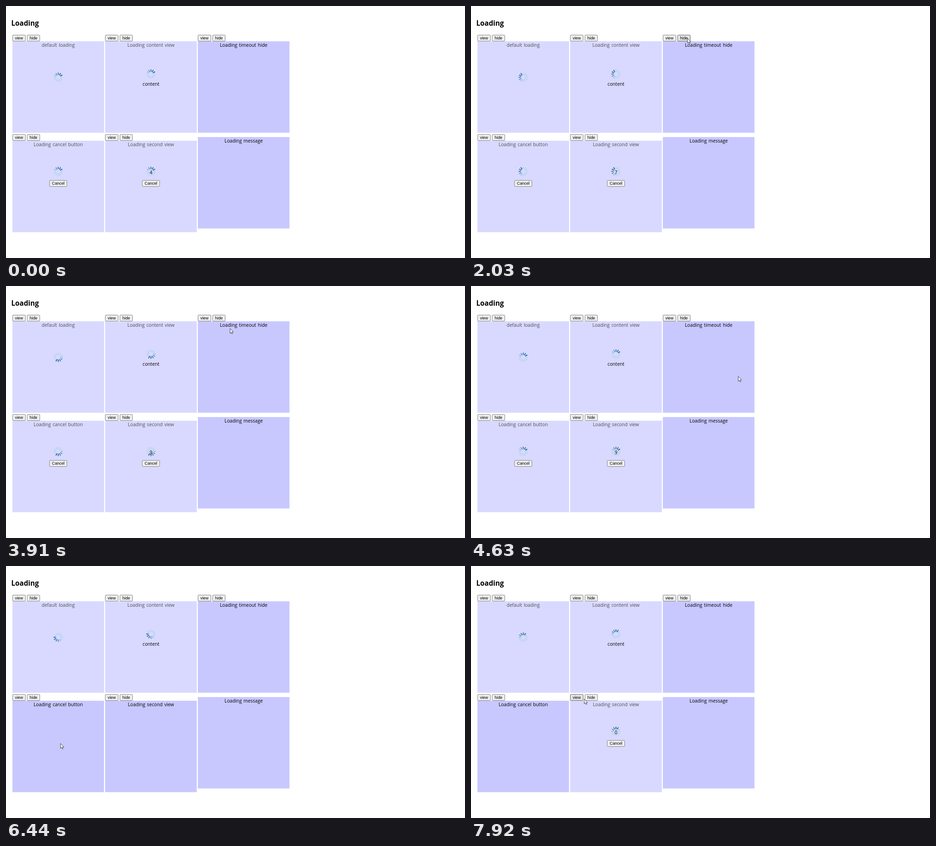
These frames come from a looping animation (1000 by 550 pixels, 8 s). An HTML page:

```html
<!DOCTYPE html>
<html lang="en">
<head>
<meta charset="utf-8">
<title>Loading</title>
<style>
  html, body { margin: 0; width: 100%; height: 100%; overflow: hidden; background: #fff; }
  svg { display: block; width: 1000px; height: 550px; }
  text { font: 10.2px "Open Sans", "Noto Sans", sans-serif; word-spacing: 1.1px; text-anchor: middle; }
  .title { font-size: 15.2px; font-weight: bold; text-anchor: start; }
  .button text { font: 8.87px "Liberation Sans", Arial, sans-serif; }
  .button rect { fill: #efefef; stroke: #767676; stroke-width: .9; }
  .button.hover rect { fill: #e5e5e5; stroke: #4f4f4f; }
</style>
</head>
<body>
<svg id="stage" viewBox="0 0 1000 550"></svg>
<script>
const LOOP = 8000, SIZE = 199.6, PITCH = 202;
const SPIN = 1150, BARS = 12;
const MOVE = 400; // travel time of the pointer to each stop
const stage = document.getElementById('stage');

const stops = [
  { at: 560, x: 641, y: 190 },
  { at: 1530, x: 471.5, y: 70 },
  { at: 2520, x: 435, y: 70 },
  { at: 2920, x: 466, y: 68 },
  { at: 4200, x: 582, y: 197 },
  { at: 5200, x: 299.5, y: 393 },
  { at: 6200, x: 118.5, y: 387 },
  { at: 7500, x: 246.5, y: 290 }
];

const always = () => true, never = () => false;
const panels = [
  { title: 'default loading', busy: always },
  { title: 'Loading content view', content: true, busy: always },
  { title: 'Loading timeout hide', content: true, busy: t => t > 2600 && t < 3440 },
  { title: 'Loading cancel button', cancel: true, busy: t => t < 6350 },
  { title: 'Loading second view', cancel: true, counter: true, busy: t => t < 5600 || t > 7650 },
  { title: 'Loading message', plain: true, busy: never }
];

function pointerAt(t) {
  const i = stops.findLastIndex(s => t >= s.at);
  if (i < 0) return null;
  const from = stops[i], to = stops[i + 1] || from;
  const p = Math.max(0, Math.min(1, (t - to.at + MOVE) / MOVE));
  const ease = to === from ? 0 : p * p * (3 - 2 * p);
  return { x: from.x + (to.x - from.x) * ease, y: from.y + (to.y - from.y) * ease };
}

const secondsAt = t => t > 7000 ? 0 : 4 + Math.floor((t + 840) / 940);

const label = (x, y, text) => `<text x="${x}" y="${y}">${text}</text>`;

function button(x, y, w, text, pointer) {
  const hover = pointer && pointer.x >= x && pointer.x <= x + w + 2.5
    && pointer.y >= y && pointer.y <= y + 14;
  return `<g class="button${hover ? ' hover' : ''}">
    <rect x="${x + .4}" y="${y + .4}" width="${w - .8}" height="13.2" rx="1.5"/>
    ${label(x + w / 2, y + 10.1, text)}</g>`;
}

function spinner(x, y, t) {
  const head = Math.floor(2.4 + t / SPIN * BARS);
  let bars = '';
  for (let i = 0; i < BARS; i++) {
    const age = (head - i + BARS) % BARS;
    const k = Math.max(0, 1 - (age / 4.5) ** 2);
    const mix = (pale, dark) => Math.round(pale + (dark - pale) * k);
    bars += `<line y1="-5.8" y2="-9.5" transform="rotate(${i * 360 / BARS})"
      stroke="rgb(${mix(182, 34)},${mix(213, 112)},${mix(234, 167)})"/>`;
  }
  return `<g transform="translate(${x} ${y})" stroke-width="2.1" stroke-linecap="round">${bars}</g>`;
}

function panel(p, index, t, pointer) {
  const x = 14 + PITCH * (index % 3), mid = x + SIZE / 2;
  const y = p.plain ? 286 : index < 3 ? 77 : 294;
  const box = fill => `<rect x="${x}" y="${y}" width="${SIZE}" height="${SIZE}" ${fill}/>`;
  let out = box('fill="#c8c8ff"') + label(mid, y + 11.5, p.title);
  if (!p.plain) {
    out += button(x, y - 14, 28.7, 'view', pointer) + button(x + 31.8, y - 14, 28.2, 'hide', pointer);
  }
  if (p.busy(t)) {
    const lift = p.cancel ? 33 : p.content ? 28.5 : 21.5;
    out += box('fill="#fff" opacity=".31"') + spinner(mid, y + (p.cancel ? 67 : 100 - lift + 0), t);
    if (p.content) out += label(mid, y + 96.5, 'content');
    if (p.counter) out += label(mid, y + 73, secondsAt(t));
    if (p.cancel) out += button(mid - 19.3, y + 86.3, 38.6, 'Cancel', pointer);
  }
  return out;
}

const arrow = ({ x, y }) => `<path transform="translate(${x} ${y})" fill="#fff" stroke="#222"
  stroke-width=".8" stroke-linejoin="round"
  d="M.3 .4V10.9L2.7 8.7L4.3 12.3L5.8 11.6L4.3 8.1H7.5Z"/>`;

function draw() {
  const t = performance.now() % LOOP, pointer = pointerAt(t);
  stage.innerHTML = '<text class="title" x="11.5" y="42.5">Loading</text>'
    + panels.map((p, i) => panel(p, i, t, pointer)).join('')
    + (pointer ? arrow(pointer) : '');
  requestAnimationFrame(draw);
}
draw();
</script>
</body>
</html>
```
